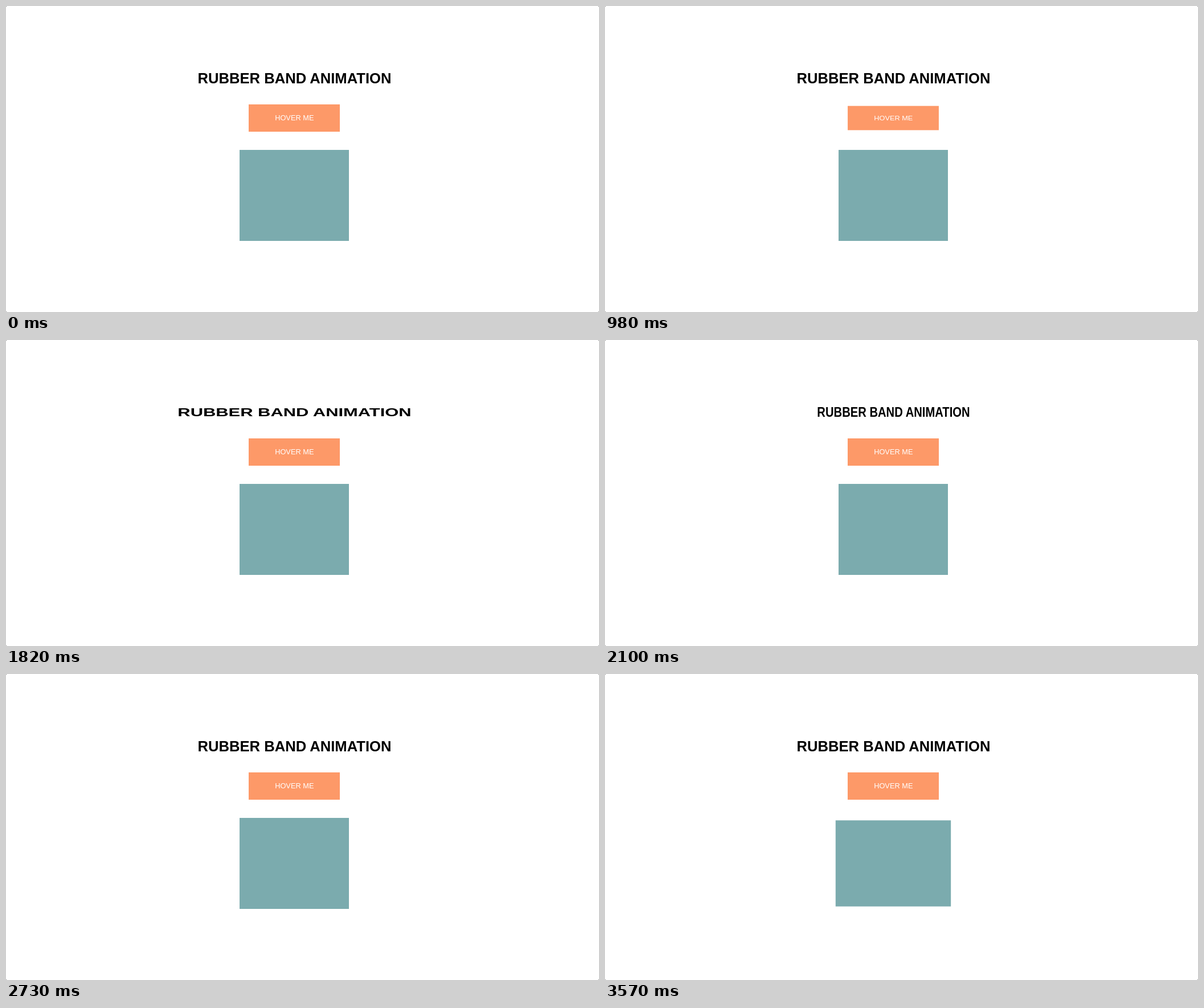
These frames come from a looping animation (1041x538 px, 3640 ms). An HTML page:

```html
<!DOCTYPE html>
<html lang="en">
<head>
<meta charset="utf-8">
<title>Rubber band animation</title>
<style>
  html, body { margin: 0; width: 100%; height: 100%; overflow: hidden; background: #fff; }
  svg { display: block; width: 100vw; height: 100vh; }
  text { font-family: "Liberation Sans", Helvetica, Arial, sans-serif; text-anchor: middle; }
</style>
</head>
<body>
<svg viewBox="0 0 1041 538">
  <path fill="#8a8a8a" d="M0 0h2.5q-2.5 0-2.5 2.5zM1041 0v2.5q0-2.5-2.5-2.5zM0 538v-2.5q0 2.5 2.5 2.5zM1041 538h-2.5q2.5 0 2.5-2.5z"/>
  <g id="title">
    <text x="506.5" y="136" font-size="25.6" font-weight="700">RUBBER BAND ANIMATION</text>
  </g>
  <g id="button">
    <rect x="426" y="173" width="160" height="48" fill="#fd9968"/>
    <text x="506.3" y="201.4" font-size="12.8" fill="#fff">HOVER ME</text>
  </g>
  <g id="box">
    <rect x="410" y="253" width="192" height="160" fill="#7babae"/>
  </g>
</svg>
<script>
  const LOOP = 3640, TICK = 70;

  // Keyframes of the stretch: [progress, scaleX, scaleY]
  const BAND = [
    [0, 1, 1],
    [0.3, 1.25, 0.75],
    [0.4, 0.75, 0.95],
    [0.6, 1.15, 0.85],
    [1, 1, 1]
  ];

  const part = (id, cx, cy, start, length) =>
    ({ el: document.getElementById(id), cx, cy, start, length });

  const parts = [
    part("button", 506, 197, 411, 1205),
    part("title", 506.5, 126.7, 1648, 1075),
    part("box", 506, 333, 2767, 1073)
  ];

  // CSS "ease": cubic-bezier(.25, .1, .25, 1)
  function ease(x) {
    const bez = (a, b, u) => 3 * a * u * (1 - u) ** 2 + 3 * b * u * u * (1 - u) + u ** 3;
    let lo = 0, hi = 1;
    for (let i = 0; i < 24; i++) {
      const mid = (lo + hi) / 2;
      if (bez(0.25, 0.25, mid) < x) lo = mid; else hi = mid;
    }
    return bez(0.1, 1, lo);
  }

  function stretch(p) {
    if (p <= 0 || p >= 1) return [1, 1];
    const i = BAND.findIndex(key => key[0] > p);
    const [p0, x0, y0] = BAND[i - 1], [p1, x1, y1] = BAND[i];
    const k = ease((p - p0) / (p1 - p0));
    return [x0 + (x1 - x0) * k, y0 + (y1 - y0) * k];
  }

  function draw(t) {
    for (const { el, cx, cy, start, length } of parts) {
      const [sx, sy] = stretch((t - start) / length);
      el.setAttribute("transform",
        `translate(${cx} ${cy}) scale(${sx} ${sy}) translate(${-cx} ${-cy})`);
    }
  }

  const began = performance.now();
  function frame() {
    const t = (performance.now() - began) % LOOP;
    draw(Math.floor(t / TICK) * TICK);
    requestAnimationFrame(frame);
  }
  frame();
</script>
</body>
</html>
```
